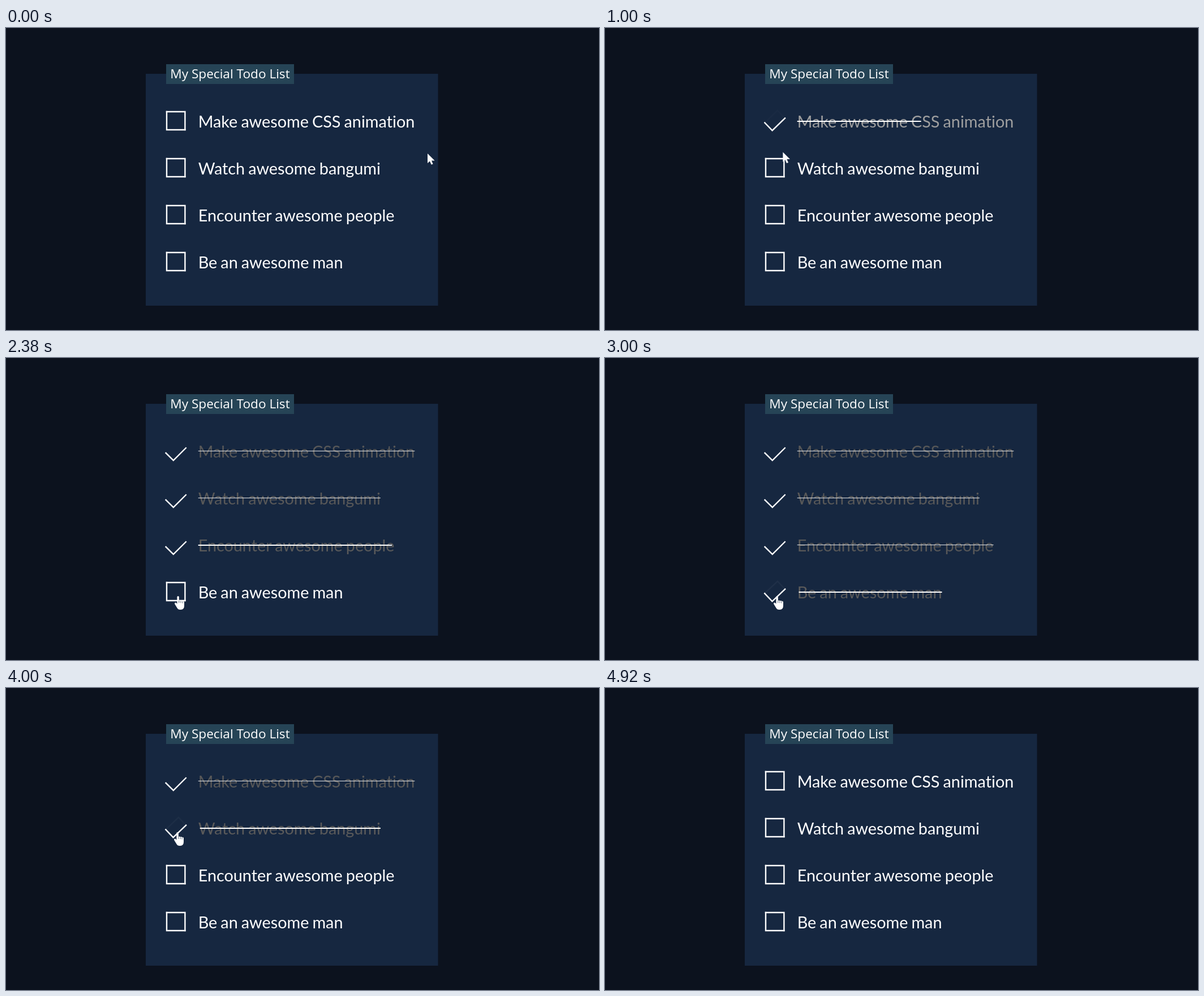
Recreate the animation shown at these times as an HTML page. Size 1048 by 534 pixels, loop 5.07 s.

```html
<!DOCTYPE html>
<html lang="en">
<head>
<meta charset="utf-8">
<title>Todo list</title>
<style>
  html, body { margin: 0; width: 100%; height: 100%; overflow: hidden; background: #0c121e; }
  svg { display: block; width: 1048px; height: 534px; }
  .title { font: 22.6px "Open Sans", "Noto Sans", sans-serif; fill: #fff; }
  .label { font: 28.8px Lato, sans-serif; font-variant-ligatures: none; word-spacing: -.045em; }
  .box path { fill: none; stroke: #fff; stroke-width: 2.4; stroke-linecap: square; }
  .strike, .cursor { fill: #fff; }
  .gaps { fill: none; stroke: #162740; stroke-width: .7; }
</style>
</head>
<body>
<svg viewBox="0 0 1048 534">
  <rect width="1048" height="534" fill="#0c121e"/>
  <rect x="247" y="81" width="516.5" height="410" fill="#162740"/>
  <rect x="283" y="64" width="226" height="35" fill="#264456"/>
  <text class="title" x="290.3" y="89">My Special Todo List</text>
  <g id="rows"></g>
  <g id="cursor" class="cursor">
    <path id="arrow" d="M0 0V17L4 13.5 6.6 19.6 9.6 18.4 7 12.4H12.6Z"/>
    <g id="hand">
      <path d="M-1.6 1.6a1.7 1.7 0 0 1 3.4 0V8q1.8-1.4 3.2.4 2-1.2 3.2.5 2.6-.8 2.8 1.8V17q0 7-6 7H3.5q-3.5 0-5-3L-5.8 14q-.6-2.6 2-2.4L-1.6 13.5Z"/>
      <path class="gaps" d="M1.8 8v4M5 8.6v3.6M8.2 9.2v3.4"/>
    </g>
  </g>
</svg>
<script>
const LOOP = 5070, STEP = LOOP / 66;
const LEFT = 339.7, TOP = 164, PITCH = 83;
const NS = 'http://www.w3.org/2000/svg';
const $ = id => document.getElementById(id);
const mix = (a, b, p) => a + (b - a) * p;

// times of the two clicks and the spot where they land
const items = [
  { text: 'Make awesome CSS animation', on: 833, off: 4450, x: 298, y: 168 },
  { text: 'Watch awesome bangumi', on: 1420, off: 3985, x: 303, y: 255 },
  { text: 'Encounter awesome people', on: 1955, off: 3510, x: 307, y: 329 },
  { text: 'Be an awesome man', on: 2490, off: 2985, x: 304, y: 421 }
];

// CSS "ease" curve
function ease(x) {
  if (x <= 0) return 0;
  if (x >= 1) return 1;
  const bez = (a, b, u) => 3 * a * u * (1 - u) ** 2 + 3 * b * u * u * (1 - u) + u ** 3;
  let lo = 0, hi = 1;
  for (let i = 0; i < 24; i++) {
    const mid = (lo + hi) / 2;
    if (bez(.25, .25, mid) < x) lo = mid; else hi = mid;
  }
  return bez(.1, 1, lo);
}

function make(tag, cls, parent) {
  const el = document.createElementNS(NS, tag);
  el.setAttribute('class', cls);
  return parent.appendChild(el);
}

function set(el, attrs) {
  for (const name in attrs) el.setAttribute(name, attrs[name]);
}

const rows = items.map(({ text, on, off }, i) => {
  const g = make('g', 'row', $('rows'));
  set(g, { transform: `translate(0 ${PITCH * i})` });
  const box = make('g', 'box', g);
  const open = make('path', 'open', box);
  const tick = make('path', 'tick', box);
  const label = make('text', 'label', g);
  label.textContent = text;
  set(label, { x: LEFT, y: 175.6 });
  const strike = make('rect', 'strike', g);
  return { on, off, box, open, tick, label, strike, width: label.getComputedTextLength(), y: TOP + PITCH * i };
});

function drawRow(r, t) {
  const level = ms => ease((t - r.on) / ms) - ease((t - r.off) / ms);
  const p = level(200), q = level(500);

  // the square turns and flattens into a tick
  const w = mix(16.2, 15.6, p), h = mix(16, 9.4, p);
  set(r.box, { transform: `translate(300.2 ${TOP - .5 * p}) rotate(${-45 * p})` });
  set(r.tick, { d: `M${-w} ${-h}V${h}H${w}` });
  set(r.open, { d: `M${-w} ${-h}H${w}V${h}`, 'stroke-opacity': 1 - p });

  const grey = Math.round(mix(255, 88, q));
  set(r.label, { fill: `rgb(${grey},${grey},${grey})` });

  // grows from the left, leaves to the right
  const len = r.width * q;
  const x = t < r.off ? LEFT : LEFT + r.width - len;
  const rest = q > .995;
  set(r.strike, { x, y: TOP, width: len < 1 ? 0 : len, height: rest ? 1 : 2, opacity: rest ? .88 : 1 });
}

// down the list, back up, then out of the corner
const hop = (to, leave) => ({ leave: leave + 80, time: 250, x: to.x, y: to.y, bow: 14, lift: 0 });
const moves = [
  { leave: 0, time: 690, x: items[0].x, y: items[0].y, bow: 0, lift: 90 },
  ...items.slice(1).map((to, i) => hop(to, items[i].on)),
  ...items.slice(0, -1).map((to, i) => hop(to, items[i + 1].off)).reverse(),
  { leave: items[0].off + 80, time: 390, x: 1040, y: 575, bow: 0, lift: 0 }
];

function drawCursor(t) {
  let x = 745, y = 222;
  for (const m of moves) {
    const p = ease((t - m.leave) / m.time), arc = Math.sin(Math.PI * p);
    x = mix(x, m.x, p) + m.bow * arc;
    y = mix(y, m.y, p) - m.lift * arc;
  }
  const over = rows.some(r => Math.abs(y - r.y) <= 18 && x > 283 && x < LEFT + r.width);
  set($('cursor'), { transform: `translate(${x.toFixed(1)} ${y.toFixed(1)})` });
  $('arrow').style.display = over ? 'none' : '';
  $('hand').style.display = over ? '' : 'none';
}

// the picture advances about thirteen times a second
function draw(ms) {
  const t = STEP * Math.min(65, Math.floor((ms % LOOP + 6) / STEP));
  rows.forEach(r => drawRow(r, t));
  drawCursor(t);
}

const start = performance.now();
function loop() {
  draw(performance.now() - start);
  requestAnimationFrame(loop);
}
loop();
</script>
</body>
</html>
```
